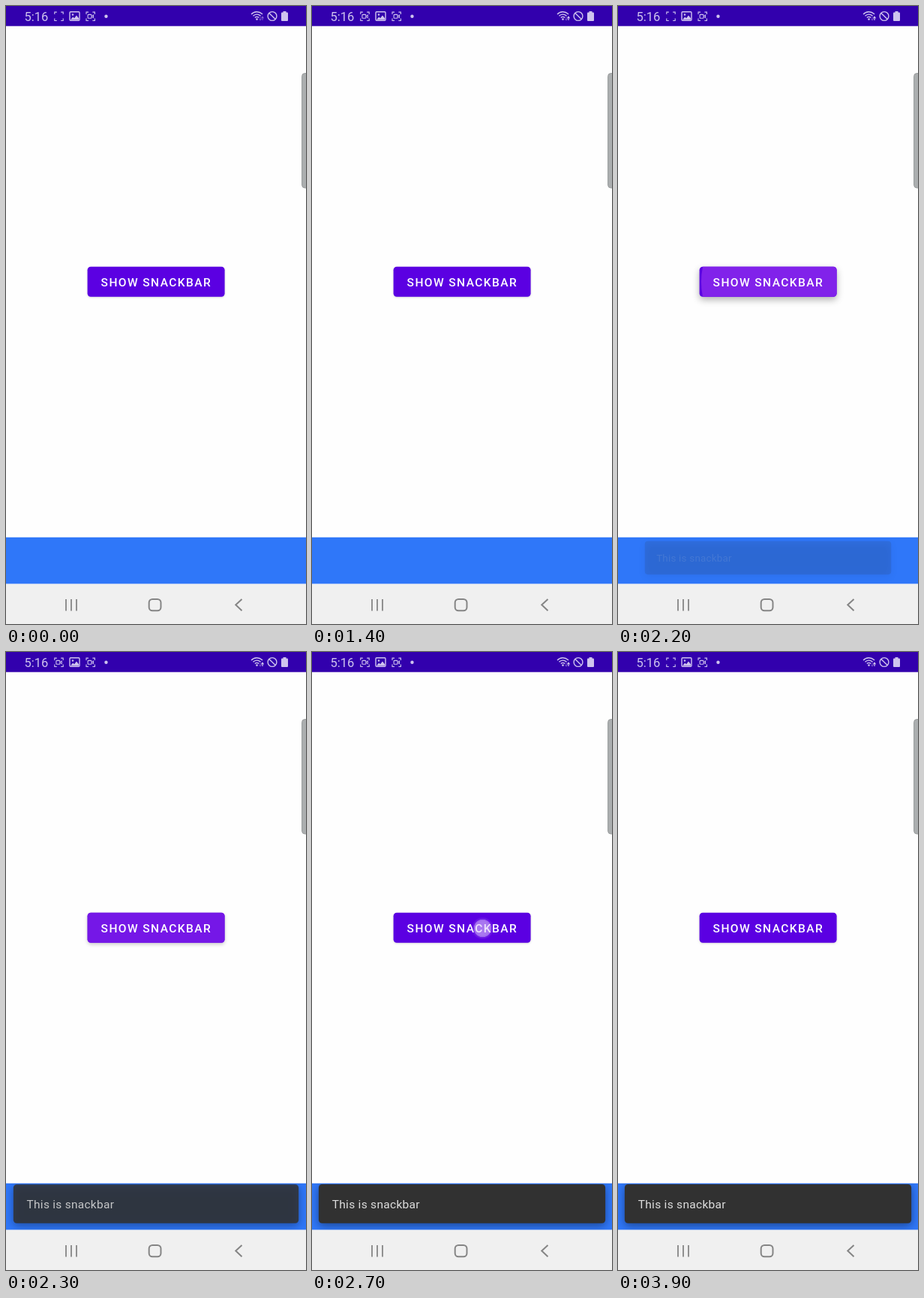
Write an HTML page with a canvas that moves like this. It is 400 px wide and 822 px high and loops after 4 s.

```html
<!DOCTYPE html>
<html lang="en">
<head>
<meta charset="utf-8">
<title>Snackbar demo</title>
<style>
  html, body { margin: 0; width: 100%; height: 100%; overflow: hidden; background: #fff; }
  canvas { display: block; width: 400px; height: 822px; }
</style>
</head>
<body>
<canvas id="stage" width="400" height="822"></canvas>
<script>
const ctx = document.getElementById('stage').getContext('2d');
const LOOP = 4000, STEP = 100;
const DP = 400 / 360;
const ICON = '#cfc4ee';
const clamp = v => Math.max(0, Math.min(1, v));

function rect(x, y, w, h, color) {
  ctx.fillStyle = color;
  ctx.fillRect(x, y, w, h);
}

function roundRect(x, y, w, h, r) {
  ctx.beginPath();
  ctx.roundRect(x, y, w, h, r);
}

function circle(x, y, r, color) {
  ctx.beginPath();
  ctx.arc(x, y, r, 0, Math.PI * 2);
  ctx.fillStyle = color;
  ctx.fill();
}

function line(points, color, width) {
  ctx.beginPath();
  points.forEach(([x, y]) => ctx.lineTo(x, y));
  ctx.strokeStyle = color;
  ctx.lineWidth = width;
  ctx.stroke();
}

function text(str, x, y, size, weight, spacing, color) {
  ctx.font = `${weight} ${size}px Roboto, sans-serif`;
  ctx.letterSpacing = spacing + 'px';
  ctx.fillStyle = color;
  ctx.fillText(str, x, y);
}

function shadow(blur, dy, alpha) {
  ctx.shadowColor = `rgba(0,0,0,${alpha})`;
  ctx.shadowBlur = blur;
  ctx.shadowOffsetY = dy;
}

function captureIcon(cx, cy, camera) {
  for (const sx of [-1, 1]) for (const sy of [-1, 1]) {
    const x = cx + sx * 5.7, y = cy + sy * 5.7;
    line([[x - sx * 3, y], [x, y], [x, y - sy * 3]], ICON, 1.1);
  }
  if (!camera) return;
  roundRect(cx - 3.6, cy - 2.4, 5, 4.8, 1);
  ctx.stroke();
  line([[cx + 1.6, cy], [cx + 3.8, cy - 2], [cx + 3.8, cy + 2], [cx + 1.6, cy]], ICON, 1);
}

function pictureIcon(x, y) {
  roundRect(x, y, 13, 11.5, 1.2);
  ctx.strokeStyle = ICON;
  ctx.lineWidth = 1.4;
  ctx.stroke();
  circle(x + 4, y + 3.7, 1.2, ICON);
  ctx.beginPath();
  [[1, 10.5], [4.3, 6.8], [6, 8.5], [9, 4.8], [12, 8.4], [12, 10.5]]
    .forEach(([px, py]) => ctx.lineTo(x + px, y + py));
  ctx.fill();
}

function wifiIcon(uploading) {
  ctx.strokeStyle = ICON;
  ctx.lineWidth = 1.4;
  for (const r of [3.6, 6.9, 10.2]) {
    ctx.beginPath();
    ctx.arc(334.5, 18, r, -Math.PI * 0.76, -Math.PI * 0.24);
    ctx.stroke();
  }
  circle(334.5, 17.6, 1.3, ICON);
  const dim = 'rgba(207,196,238,.4)';
  line([[339, 14.5], [339, 19]], dim, 1);
  line([[337.6, 17.4], [339, 19], [340.4, 17.4]], dim, 1);
  const up = uploading ? ICON : dim;
  line([[342, 14.5], [342, 19]], up, 1.2);
  line([[340.5, 16.3], [342, 14.3], [343.5, 16.3]], up, 1.2);
}

function statusBar(t) {
  rect(0, 0, 400, 26.7, '#3200ad');
  text('5:16', 24.5, 20, 16.5, 400, 0, ICON);
  const blink = [400, 1400, 2300, 3300].some((on, i) => t >= on && t < on + (i < 2 ? 400 : 500));
  captureIcon(70.5, 13.8, blink);
  pictureIcon(85, 7.8);
  captureIcon(112.7, 13.8, true);
  circle(133.5, 13.8, 2.2, ICON);
  wifiIcon(t >= 1000);
  ctx.beginPath();
  ctx.arc(355, 13.5, 5.9, 0, Math.PI * 2);
  ctx.lineWidth = 1.4;
  ctx.strokeStyle = ICON;
  ctx.stroke();
  line([[350.9, 9.4], [359.1, 17.6]], ICON, 1.4);
  ctx.fillStyle = ICON;
  roundRect(367, 8.5, 9, 11.5, 1);
  ctx.fill();
  ctx.fillRect(369.5, 7, 4, 2);
}

function button(t) {
  const x = 108.6, y = 346.7, w = 183, h = 40;
  const lift = t >= 2100 && t < 2500 ? [0.6, 1, 0.4, 0.1][(t - 2100) / STEP] : 0;
  ctx.save();
  shadow(3 + 7 * lift, 1 + 3 * lift, 0.14 + 0.16 * lift);
  roundRect(x, y, w, h, 4 * DP);
  ctx.fillStyle = '#5b00e2';
  ctx.fill();
  ctx.restore();

  ctx.save();
  roundRect(x, y, w, h, 4 * DP);
  ctx.clip();
  if (t >= 2100 && t < 2600) {
    const k = (t - 2100) / STEP;
    const alpha = k < 1 ? 0.65 : clamp(1 - (k - 1) * 0.3);
    circle(222 - 10 * k, 367, 61 + 40 * k, `rgba(129,34,234,${alpha})`);
  }
  ctx.restore();
  text('SHOW SNACKBAR', 126.6, 373, 14 * DP, 500, 1.39, '#fff');

  const touch = clamp((2900 - t) / 200);
  if (t >= 2700 && touch > 0) {
    const glow = ctx.createRadialGradient(227.5, 367.5, 9, 227.5, 367.5, 15);
    glow.addColorStop(0, `rgba(225,205,250,${0.58 * touch})`);
    glow.addColorStop(0.4, `rgba(225,205,250,${0.5 * touch})`);
    glow.addColorStop(0.5, `rgba(190,150,245,${0.22 * touch})`);
    glow.addColorStop(1, 'rgba(190,150,245,0)');
    circle(227.5, 367.5, 15, glow);
  }
}

function snackbar(t) {
  if (t < 2200) return;
  const alpha = t < 2300 ? 0.13 : t < 2400 ? 0.86 : 1;
  const scale = t < 2300 ? 0.859 : t < 2400 ? 0.995 : 1;
  ctx.save();
  ctx.beginPath();
  ctx.rect(0, 706.7, 400, 62);
  ctx.clip();
  ctx.translate(200, 734);
  ctx.scale(scale, scale);
  ctx.translate(-200, -734);
  ctx.globalAlpha = alpha;
  ctx.save();
  shadow(12, 3, 0.42);
  roundRect(8.9, 708, 382.2, 51.8, 4 * DP);
  ctx.fillStyle = '#313131';
  ctx.fill();
  ctx.restore();
  text('This is snackbar', 26.7, 739.9, 14 * DP, 400, 0.28, '#dedede');
  ctx.restore();
}

function navBar() {
  const gray = '#858585';
  rect(0, 768.7, 400, 54, '#f0f0f0');
  for (const x of [80, 87, 94]) line([[x, 789], [x, 804.5]], gray, 1.8);
  roundRect(190.7, 788.9, 15.8, 15.4, 4.6);
  ctx.lineWidth = 2;
  ctx.stroke();
  line([[314.5, 789], [306.3, 796.6], [314.5, 804.2]], gray, 2);
}

function edgeHandle() {
  roundRect(394.6, 89.5, 12, 152.5, 4);
  ctx.fillStyle = '#abaeaf';
  ctx.fill();
  ctx.strokeStyle = '#989b9c';
  ctx.lineWidth = 1;
  ctx.stroke();
}

function draw(now) {
  const t = Math.floor((now % LOOP) / STEP) * STEP;
  rect(0, 0, 400, 822, '#fefefe');
  statusBar(t);
  edgeHandle();
  button(t);
  rect(0, 706.7, 400, 62, '#2f77f9');
  snackbar(t);
  navBar();
}

const start = performance.now();
function frame() {
  draw(performance.now() - start);
  requestAnimationFrame(frame);
}
frame();
</script>
</body>
</html>
```
